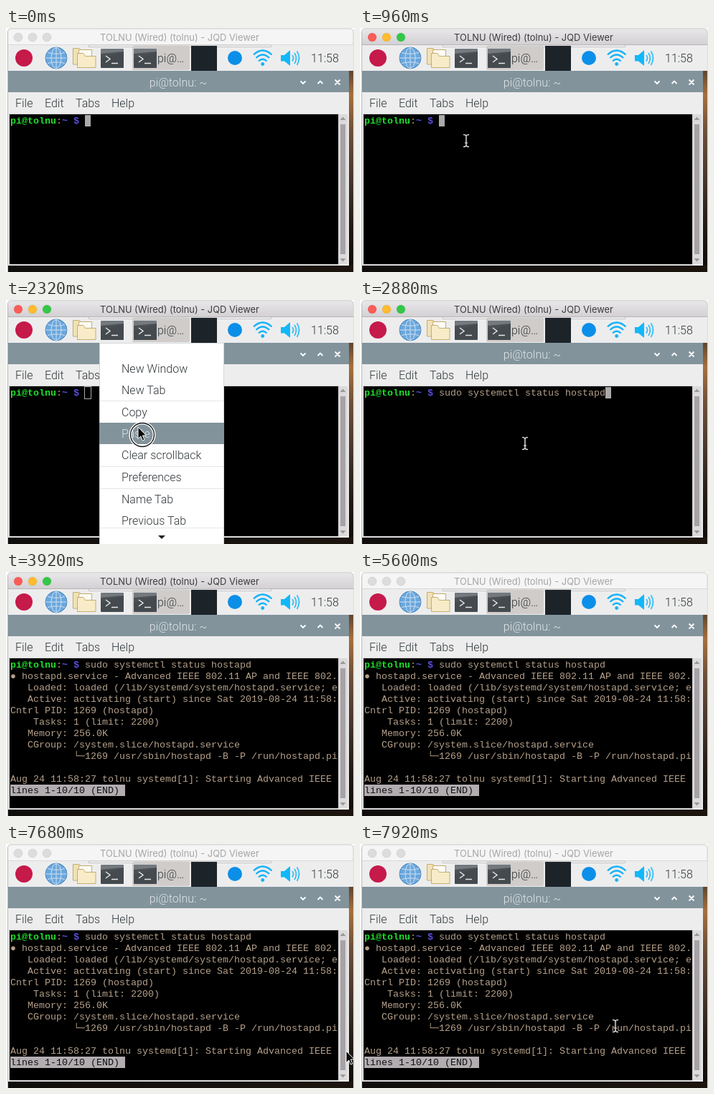
An HTML page that plays this animation: 485x342 px, repeating every 8 s.

```html
<!DOCTYPE html>
<html lang="en">
<head>
<meta charset="utf-8">
<title>Remote terminal</title>
<style>
  html, body { margin: 0; width: 100%; height: 100%; overflow: hidden; background: #fff; }
  svg { display: block; width: 485px; height: 342px; }
  text { white-space: pre; }
  .ui { font: 300 16px Roboto, sans-serif; fill: #31373a; }
  .mono { font: 13.333px "Liberation Mono", monospace; fill: #b5a08a; }
  .bold { font-weight: 700; }
  .title { font: 12.9px Inter, sans-serif; text-anchor: middle; }
</style>
</head>
<body>
<svg viewBox="0 0 485 342">
  <defs>
    <linearGradient id="bar" x2="0" y2="1">
      <stop stop-color="#e9e7e9"/><stop offset="1" stop-color="#d2d0d2"/>
    </linearGradient>
    <linearGradient id="sunset" x2="0" y2="1">
      <stop stop-color="#5e4530"/><stop offset=".12" stop-color="#a5703c"/>
      <stop offset=".3" stop-color="#6e503a"/><stop offset=".55" stop-color="#45342a"/>
      <stop offset=".8" stop-color="#1f1712"/><stop offset="1" stop-color="#0f0b08"/>
    </linearGradient>
    <linearGradient id="ground">
      <stop stop-color="#100e0c"/><stop offset="1" stop-color="#1c150e"/>
    </linearGradient>
    <clipPath id="screen"><rect x="5" y="121" width="458" height="210"/></clipPath>
    <g id="console">
      <rect width="32" height="27" rx="1.5" fill="#4b5055"/>
      <path d="M0 7V1.5Q0 0 1.5 0H30.5Q32 0 32 1.5V4Z" fill="#73797e"/>
      <path d="M0 27V14L32 5V27Z" fill="#3f4449" opacity=".5"/>
      <path d="M7 10l6 4.5-6 4.5M15 20.5h9" fill="none" stroke="#e4e6e8" stroke-width="1.5"/>
    </g>
  </defs>

  <!-- Viewer window -->
  <path d="M2.5 342V6Q2.5 1 7.5 1H479Q484 1 484 6V342Z" fill="#ededed" stroke="#b9b9b9"/>
  <path id="titleBar" d="M3 24V6Q3 1.5 7.5 1.5H479Q483.5 1.5 483.5 6V24Z"/>
  <path id="titleEdge" d="M3 23.5H484"/>
  <g id="lights" stroke-width=".5">
    <circle cx="17" cy="13" r="6"/><circle cx="37" cy="13" r="6"/><circle cx="57" cy="13" r="6"/>
  </g>
  <text id="viewerTitle" class="title" x="242" y="17.5">TOLNU (Wired) (tolnu) - JQD Viewer</text>

  <!-- Desktop panel -->
  <rect x="3" y="24" width="481" height="36" fill="#ededed"/>
  <path d="M115.5 24V26.5H369.5V24Z" fill="#fafafa" stroke="#c2c2c2"/>
  <circle cx="25" cy="42" r="12" fill="#c51a4a"/>
  <circle cx="70" cy="42" r="15" fill="#6aa7dc" stroke="#4a88c0"/>
  <g fill="none" stroke="#cfe3f5">
    <ellipse cx="70" cy="42" rx="7" ry="14.5"/>
    <path d="M70 27.5V56.5M55.5 42H84.5M58 34.5Q70 38 82 34.5M58 49.5Q70 46 82 49.5"/>
  </g>
  <g fill="#f1e2b6" stroke="#c4ac74">
    <path d="M93.5 51V28.5H102L105 31.5H118.5V51Z"/>
    <path d="M101.5 30.5H119.5V43H101.5Z" fill="#fdfbf3"/>
    <path d="M99.5 55.5V35.5H108L110.5 39.5H125V55.5Z" fill="#f8ecc8"/>
  </g>
  <use href="#console" x="132" y="29"/>
  <rect x="176" y="25" width="80" height="34" rx="2" fill="#d0ccca"/>
  <use href="#console" x="178" y="29"/>
  <text class="ui" x="211" y="48">pi@…</text>
  <rect x="258" y="25" width="36" height="35" fill="#1d2429"/>
  <circle cx="319" cy="42" r="10" fill="#0c8fe8"/>
  <g fill="none" stroke="#12b2fb" stroke-width="2.3">
    <path d="M345 37.5Q357.5 25.5 370.5 37.5M348.5 42Q357.5 33 367 42M352 46.5Q357.5 41 363.5 46.5"/>
    <circle cx="357.7" cy="50.5" r="2" fill="#12b2fb" stroke-width="1"/>
    <path d="M399 38Q402 42 399 46.5M402 35Q407 42 402 50M405.5 32.5Q411.5 42 405.5 52" stroke="#35bdf5" stroke-width="1.8"/>
  </g>
  <path d="M383 38H388L396 31V53L388 46.5H383Z" fill="#12b8fb"/>
  <text class="ui" x="425" y="48">11:58</text>

  <!-- Terminal window -->
  <rect x="478" y="60" width="6" height="282" fill="url(#sunset)"/>
  <rect x="3" y="332" width="481" height="10" fill="url(#ground)"/>
  <rect x="3" y="60" width="475" height="273" fill="#ededed"/>
  <rect x="3" y="60" width="475" height="30" fill="#82939b"/>
  <text class="ui" x="240" y="82" text-anchor="middle" style="fill:#dfe6e9">pi@tolnu: ~</text>
  <path d="M410.5 74.5l3.500 3.500 3.500-3.500M434.5 78l3.500-3.500 3.500 3.500M458.500 72.500l7 7M465.500 72.500l-7 7" fill="none" stroke="#fff" stroke-width="1.800"/>
  <g class="ui">
    <text x="13" y="111">File</text><text x="54" y="111">Edit</text>
    <text x="97" y="111">Tabs</text><text x="147" y="111">Help</text>
  </g>
  <rect x="4.5" y="120.5" width="459" height="211" fill="#000" stroke="#cfcfcf"/>
  <rect x="464" y="121" width="12" height="210" fill="#dcdadb"/>
  <path d="M465.5 129l4-4.500 4 4.500ZM465.500 323l4 4.500 4-4.500Z" fill="#9b999b"/>
  <rect x="466" y="135" width="7" height="182" fill="#a7a2a5"/>

  <g clip-path="url(#screen)" class="mono">
    <text x="6" y="134"><tspan class="bold" fill="#1ce32a">pi@tolnu</tspan>:<tspan class="bold" fill="#5a4fd8">~ $</tspan></text>
    <text id="command" x="110" y="134">sudo systemctl status hostapd</text>
    <g id="output"></g>
    <rect id="caret" stroke="#aaa"/>
  </g>

  <g id="menu" class="ui"></g>

  <g id="pointer">
    <g id="ring" fill="none">
      <circle cx="6" cy="11" r="16.5" stroke="#fff" stroke-width="4"/>
      <circle cx="6" cy="11" r="16.5" stroke="#111" stroke-width="1.3"/>
    </g>
    <path id="arrow" d="M0 0V16.5L3.8 13L6.4 19L9 18L6.4 12H11.5Z" fill="#0a0a0a" stroke="#fff"/>
    <g id="beam" fill="none">
      <path id="beamShape" d="M-4 -8.5Q0 -8.5 0 -6Q0 -8.5 4 -8.5M0 -6V6M-4 8.5Q0 8.5 0 6Q0 8.5 4 8.5M-2 3H2" stroke="#222" stroke-width="3"/>
      <path d="M-4 -8.5Q0 -8.5 0 -6Q0 -8.5 4 -8.5M0 -6V6M-4 8.5Q0 8.5 0 6Q0 8.5 4 8.5M-2 3H2" stroke="#eee" stroke-width="1.2"/>
    </g>
  </g>
</svg>

<script>
const LOOP = 8000, STEP = 80;
const $ = id => document.getElementById(id);
const show = (id, on) => $(id).setAttribute('display', on ? 'inline' : 'none');
const set = (id, attrs) => {
  for (const key in attrs) $(id).setAttribute(key, attrs[key]);
};

const lines = [
  '● hostapd.service - Advanced IEEE 802.11 AP and IEEE 802.',
  '   Loaded: loaded (/lib/systemd/system/hostapd.service; e',
  '   Active: activating (start) since Sat 2019-08-24 11:58:',
  'Cntrl PID: 1269 (hostapd)',
  '    Tasks: 1 (limit: 2200)',
  '   Memory: 256.0K',
  '   CGroup: /system.slice/hostapd.service',
  '           └─1269 /usr/sbin/hostapd -B -P /run/hostapd.pi',
  '',
  'Aug 24 11:58:27 tolnu systemd[1]: Starting Advanced IEEE '
];
$('output').innerHTML =
  lines.map((line, i) => `<text x="6" y="${150 + 16 * i}">${line}</text>`).join('') +
  '<rect x="6" y="298" width="160" height="16" fill="#b1adb0"/>' +
  '<text x="6" y="310" style="fill:#111">lines 1-10/10 (END)</text>';

const items = [
  ['New Window', 102], ['New Tab', 132], ['Copy', 163], ['Paste', 193],
  ['Clear scrollback', 223], ['Preferences', 254], ['Name Tab', 285], ['Previous Tab', 315]
];
$('menu').innerHTML =
  '<rect x="130.5" y="60.5" width="173" height="290" fill="#fff" stroke="#d3d6d8"/>' +
  '<path d="M131 141.5H303M131 233.5H303M131 264.5H303M131 319.5H303" stroke="#e6e6e6"/>' +
  '<path d="M212 330h10l-5 5Z" fill="#222"/>' +
  '<rect id="hover" x="130" width="174" height="30" fill="#82939b"/>' +
  items.map(([name, y]) => `<text x="161" y="${y}">${name}</text>`).join('');
const labels = $('menu').querySelectorAll('text');

// Pointer visits: [time, x, y] per key; null hides the pointer.
const path = [
  [0, null], [480, 250, 325], [640, 215, 236], [720, 215, 236], [960, 148, 158], [1120, 144, 154],
  [1280, 144, 154], [1440, 127, 146], [1600, 126.5, 143], [1760, 126.5, 143],
  [2240, 184, 178], [2800, 184, 178], [2960, 276, 224], [3040, null],
  [7680, 474, 290], [7920, 356, 255], [LOOP, 356, 255]
];

function pointerAt(t) {
  const i = path.findLastIndex(key => key[0] <= t);
  const [t0, x0, y0] = path[i];
  if (x0 === null) return null;
  const [t1, x1, y1] = path[i + 1] || path[i];
  if (x1 === null || t1 === t0) return [x0, y0];
  const k = (t - t0) / (t1 - t0);
  return [x0 + (x1 - x0) * k, y0 + (y1 - y0) * k];
}

function drawViewerBar(active) {
  set('titleBar', { fill: active ? 'url(#bar)' : '#f5f5f5' });
  set('titleEdge', { stroke: active ? '#b5b3b5' : '#d8d8d8' });
  set('viewerTitle', { fill: active ? '#3c3c3c' : '#a5a5a5' });
  const colors = active ? ['#fc5b57', '#fdbc2e', '#33c748'] : ['#dcdcdc', '#dcdcdc', '#dcdcdc'];
  [...$('lights').children].forEach((light, i) => {
    light.setAttribute('fill', colors[i]);
    light.setAttribute('stroke', active ? '#0002' : '#c4c4c4');
  });
}

function drawTerminal(t, menuOpen) {
  const pasted = t >= 2560, entered = t >= 3680, done = t >= 3920;
  show('command', pasted);
  show('output', done);
  show('caret', !done);
  const hollow = menuOpen || (t >= 2400 && !pasted);
  const inset = hollow ? 0.5 : 0;
  set('caret', {
    x: (entered ? 6 : pasted ? 342 : 110) - inset,
    y: (entered ? 138 : 122) - inset,
    width: 8 + 2 * inset,
    height: 16 + 2 * inset,
    fill: hollow ? 'none' : '#aaa',
    'stroke-width': hollow ? 1 : 0
  });
}

function drawPointer(t, menuOpen) {
  const pos = pointerAt(t);
  show('pointer', pos);
  let hovered = -1;
  if (pos) {
    const [x, y] = pos;
    const beam = !menuOpen && x < 463 && y > 121 && y < 331;
    set('pointer', { transform: `translate(${x} ${y})` });
    show('beam', beam);
    show('arrow', !beam);
    show('ring', t >= 2320 && t < 2400);
    if (menuOpen && x > 130) hovered = items.findIndex(item => y >= item[1] - 21 && y < item[1] + 9);
  }
  show('hover', hovered >= 0);
  if (hovered >= 0) set('hover', { y: items[hovered][1] - 21 });
  labels.forEach((label, i) => label.style.fill = i === hovered ? '#dfe5e8' : '');
}

function draw(now) {
  const t = Math.floor(now % LOOP / STEP) * STEP;
  const menuOpen = t >= 1600 && t < 2400;
  drawViewerBar(t >= 480 && t < 5600);
  drawTerminal(t, menuOpen);
  show('menu', menuOpen);
  drawPointer(t, menuOpen);
  requestAnimationFrame(draw);
}
draw(performance.now());
</script>
</body>
</html>
```
